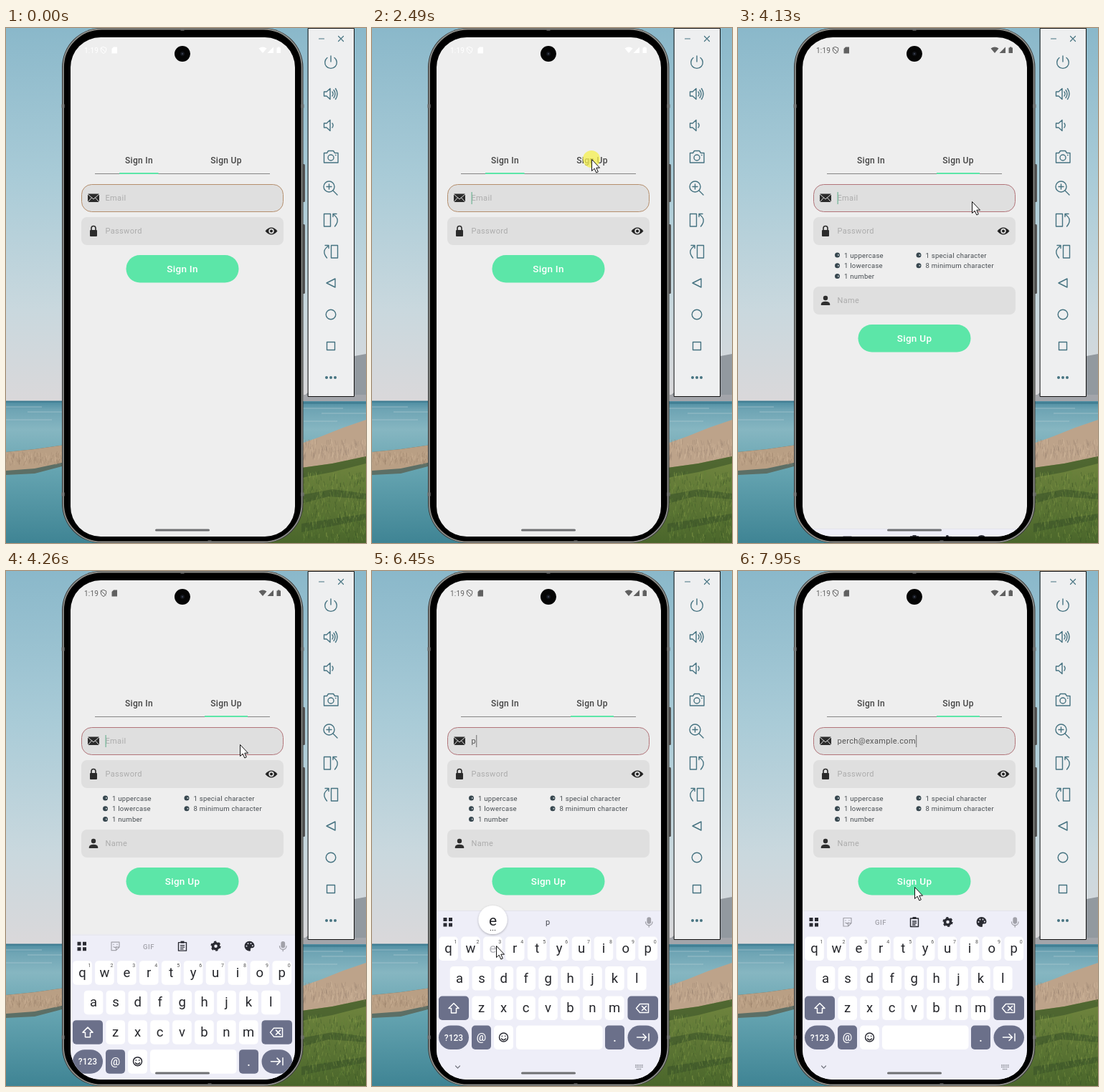
An HTML page for the animation above (8000 ms loop, 502 by 719 pixels).

```html
<!DOCTYPE html>
<html lang="en">
<head>
<meta charset="utf-8">
<title>Sign up form</title>
<style>
  html, body { margin: 0; width: 100%; height: 100%; overflow: hidden; }
  svg { display: block; width: 502px; height: 719px; font-family: Roboto, sans-serif; }
  .tab { font-size: 12px; font-weight: 500; letter-spacing: .3px; fill: #444; text-anchor: middle; }
  .input { font-size: 11px; letter-spacing: .35px; fill: #acacac; }
  .hint { font-size: 9.5px; letter-spacing: .28px; fill: #454b50; }
  .button { font-size: 13.5px; font-weight: 500; letter-spacing: .3px; fill: #fff; text-anchor: middle; }
  .key { font-size: 18.5px; fill: #25262b; text-anchor: middle; }
  .digit { font-size: 7px; fill: #555; text-anchor: middle; }
  .word { font-size: 11px; fill: #44464e; text-anchor: middle; }
  .line { fill: none; stroke-linecap: round; stroke-linejoin: round; }
</style>
</head>
<body>
<svg viewBox="0 0 502 719">
  <defs>
    <linearGradient id="sky" x2="0" y2="1">
      <stop stop-color="#8ab8ca"/><stop offset=".4" stop-color="#a9cbd7"/>
      <stop offset=".75" stop-color="#c9d8de"/><stop offset="1" stop-color="#dad8da"/>
    </linearGradient>
    <linearGradient id="water" x2="0" y2="1">
      <stop stop-color="#4b8ba0"/><stop offset=".06" stop-color="#6ea4b4"/><stop offset=".2" stop-color="#86b6c1"/>
      <stop offset=".5" stop-color="#64a3b0"/><stop offset="1" stop-color="#3f8494"/>
    </linearGradient>
    <linearGradient id="grass" x2="0" y2="1">
      <stop stop-color="#71863f"/><stop offset="1" stop-color="#4a662b"/>
    </linearGradient>
    <clipPath id="screenClip"><rect x="90" y="13" width="313" height="697" rx="42"/></clipPath>
    <filter id="soft" x="-30%" y="-30%" width="160%" height="160%">
      <feDropShadow dx="0" dy="1" stdDeviation="1.5" flood-opacity=".3"/>
    </filter>
  </defs>

  <g id="landscape">
    <rect width="502" height="522" fill="url(#sky)"/>
    <path d="M415 522V514L440 494 470 470 486 458 502 455V528H415Z" fill="#92999f"/>
    <path d="M415 523V512H502V523Z" fill="#a3a5aa"/>
    <rect y="521" width="502" height="198" fill="url(#water)"/>
    <path d="M0 521.500H80M412 523.500H502" stroke="#3d7b90" stroke-width="2"/>
    <path d="M0 529H50M30 536H80M0 547H64M412 531H470M440 538H502M415 549H462" stroke="#b5ced5" opacity=".6"/>
    <path d="M0 592 40 588 82 582V611L40 622 0 624Z" fill="#5c6f66"/>
    <path d="M0 592 40 588 82 582V606L40 615 0 618Z" fill="#b99f84"/>
    <path d="M412 580 440 570 470 558 502 547V625H412Z" fill="#bda38a"/>
    <path d="M360 626 412 614 455 608 502 598V719H360Z" fill="url(#grass)"/>
    <path d="M412 614 455 608 502 598V608L455 620 412 628ZM412 652 455 644 502 650V658L450 654 412 664ZM412 692 502 678V686L412 704Z" fill="#3b5428" opacity=".6"/>
  </g>

  <g id="phone">
    <rect x="413" y="190" width="4" height="53" rx="1.500" fill="#555"/>
    <rect x="413" y="274" width="4" height="97" rx="1.500" fill="#555"/>
    <rect x="78" y="0" width="336.500" height="719" rx="55" fill="#3a3b3b"/>
    <rect x="80" y="1.500" width="332.500" height="716" rx="53.500" fill="#000" stroke="#8d8e8a" stroke-width="1.800"/>
    <path d="M77 109h5M411 109h5M77 651h5M411 651h5M246 0v4M284 715v4" stroke="#777" stroke-width="5" opacity=".6"/>
    <rect x="90" y="13" width="313" height="697" rx="42" fill="#eee"/>
    <circle cx="246" cy="36" r="11" fill="#050505"/>
    <circle cx="246" cy="36" r="3" fill="#14161c"/>
    <circle cx="246" cy="36" r="1.200" fill="#3c4150"/>
  </g>

  <g id="status">
    <text x="109" y="34.500" font-size="10" letter-spacing=".2">1:19</text>
    <path d="M136 26.500 139.700 28V31Q139.500 34 136 35.600 132.500 34 132.300 31V28ZM133.500 28.500 139 34" class="line" stroke="currentColor"/>
    <path d="M150 26.500H155V35.500H147.500V29Z M352.500 28.500Q358 24.500 363.500 28.500L358 35ZM373 26.500V35H364.500ZM377.500 27.500H379V26.500H381.500V27.500H383V35H377.500Z"/>
  </g>

  <text class="tab" x="185.500" y="189">Sign In</text>
  <text class="tab" x="307" y="189">Sign Up</text>
  <path d="M124 203.500H368" stroke="#858585"/>
  <rect id="indicator" y="202" height="2" fill="#5ce6a8"/>

  <rect id="emailBox" x="105.500" y="218.500" width="281" height="38" rx="14" fill="#dfdfdf"/>
  <rect x="105" y="264" width="282" height="39" rx="8" fill="#dfdfdf"/>
  <rect x="114" y="231.500" width="16" height="11.500" rx="1" fill="#2b2b2b"/>
  <path d="M114 232 122 239 130 232M114 243 119.500 237M130 243 124.500 237" class="line" stroke="#dfdfdf"/>
  <rect x="117" y="282" width="10" height="9" rx="1" fill="#2b2b2b"/>
  <path d="M119 282V279.500a3 3 0 0 1 6 0V282" class="line" stroke="#2b2b2b" stroke-width="1.600"/>
  <path d="M361.500 283.500Q370 273.500 378.500 283.500 370 293.500 361.500 283.500Z" fill="#222"/>
  <circle cx="370" cy="283.500" r="3.700" fill="#dfdfdf"/><circle cx="370" cy="283.500" r="2" fill="#222"/>
  <text id="email" class="input" x="138.500" y="241"></text>
  <rect id="caret" y="229" width="1.300" height="17"/>
  <text class="input" x="138.500" y="287">Password</text>

  <g id="signIn">
    <rect x="167.500" y="317" width="157" height="38.500" rx="19.200" fill="#5ce6a8"/>
    <text class="button" x="246" y="341">Sign In</text>
  </g>
  <g id="signUp">
    <g id="hints"></g>
    <rect x="105" y="361" width="282" height="39" rx="8" fill="#dfdfdf"/>
    <circle cx="122" cy="377" r="3.200" fill="#2f2f2f"/>
    <path d="M115.800 387V385Q117 381.800 122 381.800 127 381.800 128.200 385V387Z" fill="#2f2f2f"/>
    <text class="input" x="138.500" y="384">Name</text>
    <rect x="167.500" y="414" width="157" height="38.500" rx="19.200" fill="#5ce6a8"/>
    <text class="button" x="246" y="438">Sign Up</text>
  </g>

  <g clip-path="url(#screenClip)">
    <g id="keyboard">
      <rect x="90" y="474" width="313" height="240" fill="#eeeef8"/>
      <path d="M90 474.500H403" stroke="#e4e4ec"/>
      <path d="M99.500 484h5v5h-5zM107 484h5v5h-5zM99.500 491.500h5v5h-5zM107 491.500h5v5h-5z" fill="#2a2b33"/>
      <g class="line" stroke="#a1a1a9" stroke-width="1.300">
        <rect x="384" y="484" width="4.500" height="8" rx="2.200" fill="#a1a1a9"/>
        <path d="M381.500 490a4.700 4.700 0 0 0 9.500 0M386.200 495v2"/>
      </g>
      <g id="tools">
        <path d="M147 484.500H158V491.500L153.500 496H147ZM158 491.500H153.500V496M150 487.500v.5M155 487.500v.5M150 491q2 2 4 0" class="line" stroke="#a1a1a9" stroke-width="1.200"/>
        <text x="199" y="494" font-size="9.500" font-weight="500" letter-spacing=".6" text-anchor="middle" fill="#a1a1a9">GIF</text>
        <path d="M240.500 485H251.500V496.500H240.500ZM243.500 489H248.500M243.500 491.500H248.500M243.500 494H247" class="line" stroke="#2a2b33" stroke-width="1.400"/>
        <rect x="243.500" y="483" width="5" height="3" fill="#2a2b33"/>
        <circle cx="292.500" cy="490" r="4" fill="none" stroke="#2a2b33" stroke-width="3.500"/>
        <circle cx="292.500" cy="490" r="6" fill="none" stroke="#2a2b33" stroke-width="2.200" stroke-dasharray="3.140"/>
        <path d="M339.500 483a7 7 0 1 0 0 14q2 0 1.500-2-.8-2 1-2.500h2q2.500-.5 2.500-3-.5-6-7-6.500Z" fill="#2a2b33"/>
        <path d="M335.500 490h0M337.500 486.500h0M341.500 486.500h0M343.800 489.500h0" class="line" stroke="#eeeef8" stroke-width="1.900"/>
      </g>
      <g id="words">
        <text class="word" x="152" y="494"></text><text class="word" x="245" y="494"></text><text class="word" x="340" y="494"></text>
      </g>
      <g id="keys"></g>
      <path d="M116.500 691 119.500 694 122.500 691" class="line" stroke="#777983" stroke-width="1.200"/>
      <path d="M367 690H378M367 692.500H378M369 695.500H376" stroke="#8b8d96" stroke-width="1.500" stroke-dasharray="1.500 .8"/>
      <g id="popup">
        <circle r="20" cy="487" fill="#fff" filter="url(#soft)"/>
        <text class="key" y="495" style="font-size:21px"></text>
        <path d="M-3 501.500h0M0 501.500h0M3 501.500h0" class="line" stroke="#444" stroke-width="1.400"/>
      </g>
    </g>
    <rect x="208" y="699.500" width="76" height="3" rx="1.500" fill="#6f7073"/>
  </g>

  <g id="panel" class="line" stroke="#467381" stroke-width="1.400">
    <rect x="421.500" y=".5" width="64" height="514" fill="#eeeff0" stroke="#111" stroke-width="1"/>
    <path d="M436.500 15h7M463.500 11.500l7 7m0-7l-7 7" stroke-width="1.200"/>
    <path d="M448 41.500a8.300 8.300 0 1 0 10 0M453 39v8"/>
    <path id="speaker" d="M443.500 89h3.500l5-4.500v15L447 95h-3.500ZM455 89q2.200 3 0 6"/>
    <path d="M457 86.500q4 5.500 0 11M459.500 84.500q5 7.500 0 15"/>
    <use href="#speaker" y="44"/>
    <path d="M443.500 174.500h4l2-3h7l2 3h4.500V188h-19.500Z"/><circle cx="453" cy="181" r="4"/><path d="M459.500 177.500h.5"/>
    <circle cx="450.500" cy="221.500" r="7.500"/><path d="M456 227l6 6M450.500 218v7M447 221.500h7"/>
    <g id="rotate"><path d="M443.500 259.500h9V277h-9ZM456 259.500h5M456 259.500v4M456 260q11 7 2.500 17"/></g>
    <use href="#rotate" transform="translate(906 44) scale(-1 1)"/>
    <path d="M447 356 459 350V362Z"/><circle cx="453" cy="400" r="6.800"/><path d="M447.500 438.500h11v11h-11Z"/>
    <path d="M447 488h0M453 488h0M459 488h0" stroke-width="4"/>
  </g>

  <g id="pointer">
    <circle id="press" r="12" fill="#f6f04e" opacity=".75"/>
    <path d="M.5 .5V16.500L4.200 13.200 6.800 19 9.300 17.900 6.800 12.200H11.500Z" fill="#fff" stroke="#111"/>
  </g>
</svg>
<script>
const LOOP = 8000, ADDRESS = 'perch@example.com';
const $ = id => document.getElementById(id);

function add(parent, tag, attrs, text = '') {
  const node = document.createElementNS('http://www.w3.org/2000/svg', tag);
  for (const name in attrs) node.setAttribute(name, attrs[name]);
  node.textContent = text;
  parent.appendChild(node);
  return node;
}

// Blades of reed and grass
let seed = 7;
const random = () => (seed = seed * 16807 % 2147483647) / 2147483647;
function blades(count, x0, x1, y0, y1, height, colors) {
  const paths = colors.map(() => '');
  for (let i = 0; i < count; i++) {
    const x = x0 + random() * (x1 - x0), y = y0 + random() * (y1 - y0);
    paths[i % colors.length] += `M${x.toFixed(1)} ${y.toFixed(1)}l${(random() * 4 - 2).toFixed(1)} ${-height}`;
  }
  paths.forEach((d, i) => add($('landscape'), 'path', { d, stroke: colors[i], opacity: .4, fill: 'none' }));
}
blades(130, 0, 79, 597, 611, 6, ['#d0b599', '#967e68']);
blades(170, 414, 502, 580, 604, 7, ['#d4bba0', '#988270']);
blades(420, 414, 502, 624, 719, 6, ['#8ca24c', '#395326', '#5f8238']);

// Password rules
['1 uppercase', '1 lowercase', '1 number', '1 special character', '8 minimum character'].forEach((rule, i) => {
  const x = i < 3 ? 138.5 : 252, y = 317 + (i % 3) * 14.7;
  add($('hints'), 'circle', { cx: x, cy: y, r: 3.5, fill: '#37474f' });
  add($('hints'), 'circle', { cx: x + 1.3, cy: y, r: 1, fill: '#c5cdd0' });
  add($('hints'), 'text', { class: 'hint', x: x + 9.5, y: y + 3.5 }, rule);
});

// Keys
const DARK = '#6b708a', keys = $('keys'), letters = {};
const cap = (x, y, width, fill = '#fff', rx = 5) => add(keys, 'rect', { x, y, width, height: 33.5, rx, fill });
[['qwertyuiop', 106.5, 510.5], ['asdfghjkl', 122, 552], ['zxcvbnm', 152.7, 593.5]].forEach(([row, x0, y], r) => {
  [...row].forEach((letter, i) => {
    const x = x0 + i * 30.92;
    cap(x - 13.3, y, 26.6);
    letters[letter] = add(keys, 'text', { class: 'key', x, y: y + 22.5 }, letter);
    if (!r) add(keys, 'text', { class: 'digit', x: x + 10, y: y + 9 }, (i + 1) % 10);
  });
});
cap(93, 593.5, 42, DARK);
cap(356.5, 593.5, 42.5, DARK);
cap(93, 634.5, 42, DARK, 16.7);
cap(139, 634.5, 27, DARK);
cap(170, 634.5, 27);
cap(201, 634.5, 120.5);
cap(325, 634.5, 27, DARK);
cap(356.5, 634.5, 42.5, DARK, 16.7);
const label = (x, y, size, text) =>
  add(keys, 'text', { x, y, 'font-size': size, 'font-weight': 500, 'text-anchor': 'middle', fill: '#fff' }, text);
label(114, 655.5, 12, '?123');
label(152.5, 656, 15, '@');
label(338.5, 657, 16, '.');
const glyph = (d, stroke = '#fff') => add(keys, 'path', { d, stroke, class: 'line', 'stroke-width': 1.5 });
glyph('M114 603.500 121 610.500H117.500V617H110.500V610.500H107Z');
glyph('M368.500 610.500 373.500 604.500H385.500V616.500H373.500ZM376.500 607.500l6 6m0-6l-6 6');
glyph('M369.500 651H382M378 646.500 382.500 651 378 655.500M386 646V656');
glyph('M177.500 651a6 6 0 1 0 12 0a6 6 0 1 0-12 0M181.300 649.200v.4M185.700 649.200v.4M180.500 653q3 3.500 6 0', '#2a2b33');

// [time, value...] tables
const POINTER = [
  [180, 464, 715], [420, 440, 590], [700, 370, 330], [950, 313, 199], [1150, 306, 175], [1350, 306, 175],
  [1490, 306, 183], [2760, 306, 183], [3000, 322, 222], [3240, 333, 252], [3450, 326, 249], [3620, 326, 249],
  [3720, 326, 242], [4330, 326, 242], [4530, 372, 420], [4730, 398, 530], [4950, 365, 556], [5090, 383, 526],
  [5320, 383, 526], [5550, 238, 538], [5850, 205, 536], [6320, 173, 523], [6600, 173, 523], [7000, 215, 505],
  [7210, 230, 497], [7600, 230, 495], [7880, 246, 441]
];
const KEYBOARD = [[4060, 238], [4130, 227], [4195, 100], [4260, 34], [4330, 9], [4400, 0]];
const INDICATOR = [[2620, 158, 54.5], [2690, 185, 56], [2760, 243, 58], [2870, 277, 60]];
const CARET = [[450, 950], [1420, 1960], [2490, 2690], [4000, 4460], [4930, 5770], [6270, 7080], [7340, 7410], [7890, 8000]];
const PRESS = [[2490, 2620], [3930, 4060], [5060, 5200], [6320, 6450], [7280, 7410]];
const POPUP = [[5200, 5340, 'p', 385], [6450, 6600, 'e', 168.5]];
const TYPED = [[0, ''], [5270, 'p'], [6590, 'pe'], [7340, ADDRESS]];
const WORDS = [[0, '', '', ''], [5620, '', 'p', ''], [6660, 'pe', ADDRESS, 'per'], [7610, '', '', '']];

const during = (table, t) => table.find(([from, to]) => t >= from && t < to);
const latest = (table, t) => table.filter(([from]) => t >= from).pop();
function tween(table, t) {
  const next = table.findIndex(([time]) => time > t);
  if (next < 0) return table[table.length - 1].slice(1);
  if (next === 0) return table[0].slice(1);
  const a = table[next - 1], b = table[next], k = (t - a[0]) / (b[0] - a[0]);
  return a.slice(1).map((v, i) => v + (b[i + 1] - v) * k);
}
const show = (id, visible) => $(id).setAttribute('visibility', visible ? 'visible' : 'hidden');
const move = (id, x, y) => $(id).setAttribute('transform', `translate(${x} ${y})`);

function render(t) {
  const signUp = t >= 2690, focused = !signUp || t >= 4000;
  show('signIn', !signUp);
  show('signUp', signUp);
  $('status').setAttribute('fill', signUp ? '#606060' : '#fff');
  $('status').setAttribute('color', signUp ? '#606060' : '#fff');
  const [barX, barWidth] = tween(INDICATOR, t);
  $('indicator').setAttribute('x', barX);
  $('indicator').setAttribute('width', barWidth);
  $('emailBox').setAttribute('stroke', !focused ? '#dfdfdf' : signUp ? '#b27479' : '#b58e6c');

  const typed = latest(TYPED, t)[1];
  $('email').textContent = typed || 'Email';
  $('email').style.fill = typed ? '#555' : '';
  $('caret').setAttribute('x', 138.5 + (typed ? $('email').getComputedTextLength() : 0));
  $('caret').setAttribute('fill', typed ? '#888' : '#79b89c');
  show('caret', during(CARET, t));

  show('keyboard', t >= 4060);
  move('keyboard', 0, tween(KEYBOARD, t)[0]);
  show('tools', t >= 4060 && (t < 5340 || t >= 7610));
  const words = latest(WORDS, t);
  [...$('words').children].forEach((node, i) => node.textContent = words[i + 1]);
  const popup = during(POPUP, t);
  show('popup', popup);
  if (popup) {
    move('popup', popup[3], 0);
    $('popup').querySelector('text').textContent = popup[2];
  }
  for (const letter of 'pe') letters[letter].style.fill = popup && popup[2] === letter ? '#b5b5bb' : '';

  show('pointer', t >= 180);
  move('pointer', ...tween(POINTER, t));
  show('press', during(PRESS, t));
}

function frame() {
  render(performance.now() % LOOP);
  requestAnimationFrame(frame);
}
frame();
</script>
</body>
</html>
```
